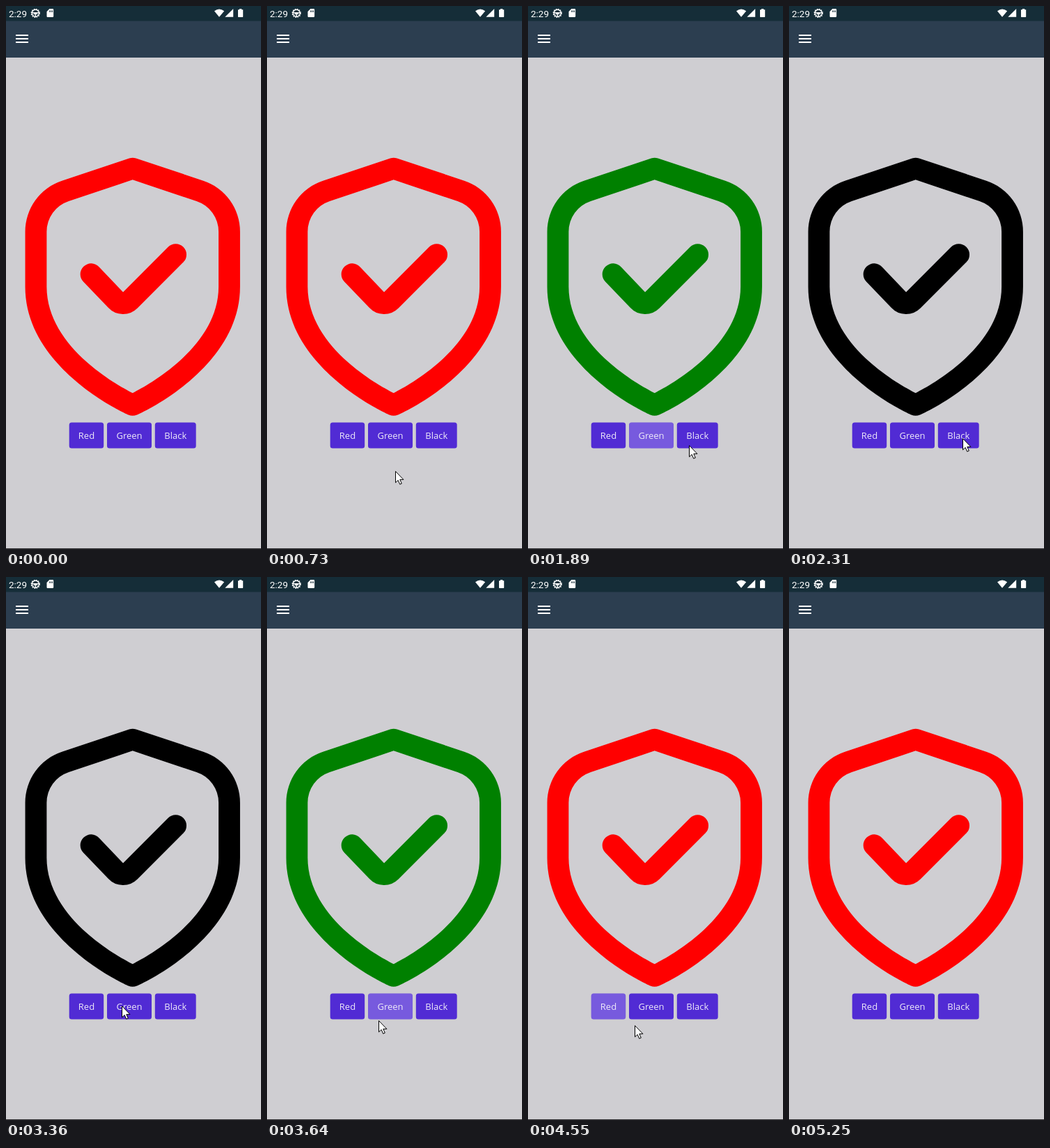
Write an HTML page that moves like this. It is 366 by 779 pixels and loops after 5450 ms.

```html
<!DOCTYPE html>
<html lang="en">
<head>
<meta charset="utf-8">
<title>Shield tint</title>
<style>
  html, body { margin: 0; width: 100%; height: 100%; overflow: hidden; background: #cfced2; }
  svg { display: block; width: 100vw; height: 100vh; }
  .label { font: 13px "Open Sans", sans-serif; fill: #eeeaf9; text-anchor: middle; }
  .clock { font: 13.5px Roboto, sans-serif; fill: #fff; }
</style>
</head>
<body>
<svg viewBox="0 0 366 779" xmlns="http://www.w3.org/2000/svg">
  <rect width="366" height="779" fill="#cfced2"/>
  <rect y="21" width="366" height="53" fill="#2c3e50"/>
  <rect width="366" height="21.5" fill="#152d38"/>
  <rect y="778" width="366" height="1" fill="#2b2b2d"/>

  <text class="clock" x="4" y="15.5">2:29</text>
  <g fill="none" stroke="#fff">
    <circle cx="42.3" cy="10.3" r="5" stroke-width="1.5"/>
    <circle cx="42.3" cy="10.3" r="6.1" stroke-width="1.2" stroke-dasharray="1.6 1.594"/>
    <path d="M37.5 9.6h9.6M42.3 10v5M39.5 11.5l2.8-1.6 2.8 1.6" stroke-width="1.3"/>
  </g>
  <path fill="#fff" fill-rule="evenodd" d="M62.4 4H67a1.2 1.2 0 0 1 1.2 1.2v9.6A1.2 1.2 0 0 1 67 16h-7.300a1.200 1.200 0 0 1-1.200-1.200V8zM62 6.400v2.400h1.100V6.400zM64 6.400v2.400h1.100V6.400zM66 6.400v2.400h1.100V6.400z"/>
  <g fill="#fff">
    <path d="M306 15.800L299 7.200Q306 1.600 313.200 7.200Z"/>
    <path d="M314.300 15.800L326.200 4V15.800Z"/>
    <path d="M333 5.300h2V4h3.200v1.300h2V15.200a.8.800 0 0 1-.8.800h-5.600a.8.800 0 0 1-.8-.8z"/>
    <path d="M14 41h18v2H14zM14 46h18v2H14zM14 51h18v2H14z"/>
  </g>

  <g id="shield" transform="translate(-3.300 217.700) scale(15.420)">
    <path d="M18.581 2.140L12.316.051a1 1 0 0 0-.632 0L5.419 2.140A4.993 4.993 0 0 0 2 6.883V12c0 7.563 9.200 11.740 9.594 11.914a1 1 0 0 0 .812 0C12.800 23.740 22 19.563 22 12V6.883A4.993 4.993 0 0 0 18.581 2.140ZM20 12c0 5.455-6.319 9.033-8 9.889C10.317 21.036 4 17.469 4 12V6.883A3 3 0 0 1 6.052 4.037L12 2.054l5.948 1.983A3 3 0 0 1 20 6.883Z"/>
    <path d="M15.300 8.300L11.112 12.500 8.868 10.160a1 1 0 1 0-1.441 1.386l2.306 2.400a1.872 1.872 0 0 0 1.345.6h.033a1.873 1.873 0 0 0 1.335-.553l4.272-4.272A1 1 0 0 0 15.300 8.300Z"/>
  </g>

  <g id="buttons"></g>
  <path id="cursor" d="M.5.600V16.800L4.200 13.400 6.700 19.200 9.300 18.100 6.800 12.400H11.900Z" fill="#fff" stroke="#000"/>
</svg>
<script>
const LOOP = 5450, STEP = 70, RIPPLE = 700;
const $ = id => document.getElementById(id);
const clamp = v => Math.max(0, Math.min(1, v));

const buttons = [
  { name: "Red", x: 90.7, w: 49.5 },
  { name: "Green", x: 145, w: 64 },
  { name: "Black", x: 213.8, w: 58.9 }
];
$("buttons").innerHTML = buttons.map(({ name, x, w }) => {
  const box = `x="${x}" y="597.5" width="${w}" height="37" rx="3.5"`;
  return `<clipPath id="clip${name}"><rect ${box}/></clipPath>
    <rect ${box} fill="#512bd4"/>
    <circle id="ripple${name}" fill="#fff" clip-path="url(#clip${name})"/>
    <text class="label" x="${x + w / 2}" y="621">${name}</text>`;
}).join("");

const clicks = [
  { at: 1470, name: "Green", color: "#008000", x: 172, y: 612 },
  { at: 2310, name: "Black", color: "#000", x: 249, y: 620 },
  { at: 3430, name: "Green", color: "#008000", x: 166, y: 615 },
  { at: 4410, name: "Red", color: "#f00", x: 121, y: 616 }
];

// Pointer tip: [time, x, y]
const path = [
  [260, 254, 756], [530, 184, 667], [730, 184, 667], [980, 172, 612],
  [1540, 172, 612], [1680, 184, 641], [1820, 215, 637], [1890, 231, 630],
  [2100, 249, 620], [2450, 249, 620], [2870, 166, 615],
  [3500, 166, 615], [3570, 166, 643], [3640, 160, 636], [3990, 121, 616],
  [4480, 121, 616], [4620, 184, 670], [4760, 254, 779]
];

function pointerAt(t) {
  const next = path.findIndex(p => p[0] > t);
  if (next < 0) return path[path.length - 1].slice(1);
  if (next === 0) return path[0].slice(1);
  const [t0, x0, y0] = path[next - 1], [t1, x1, y1] = path[next];
  const k = (t - t0) / (t1 - t0);
  return [x0 + (x1 - x0) * k, y0 + (y1 - y0) * k].map(Math.round);
}

function drawRipple({ name, x, y }, age) {
  const circle = $("ripple" + name);
  const grow = 1 - (1 - clamp(age / 300)) ** 2;
  circle.setAttribute("cx", x);
  circle.setAttribute("cy", y);
  circle.setAttribute("r", 10 + 60 * grow);
  circle.setAttribute("opacity", 0.22 * clamp(age / 75) * clamp((RIPPLE - age) / 230));
}

function render(time) {
  const t = Math.floor(time / STEP) * STEP;
  const past = clicks.filter(c => c.at <= t);
  $("shield").setAttribute("fill", past.length ? past[past.length - 1].color : "#f00");

  buttons.forEach(({ name }) => $("ripple" + name).setAttribute("opacity", 0));
  past.filter(c => t - c.at < RIPPLE).forEach(c => drawRipple(c, t - c.at));

  const [x, y] = pointerAt(t);
  $("cursor").setAttribute("transform", `translate(${x} ${y})`);
  $("cursor").setAttribute("visibility", time >= 260 && time < 4760 ? "visible" : "hidden");
}

const start = performance.now();
function frame() {
  render((performance.now() - start) % LOOP);
  requestAnimationFrame(frame);
}
frame();
</script>
</body>
</html>
```
